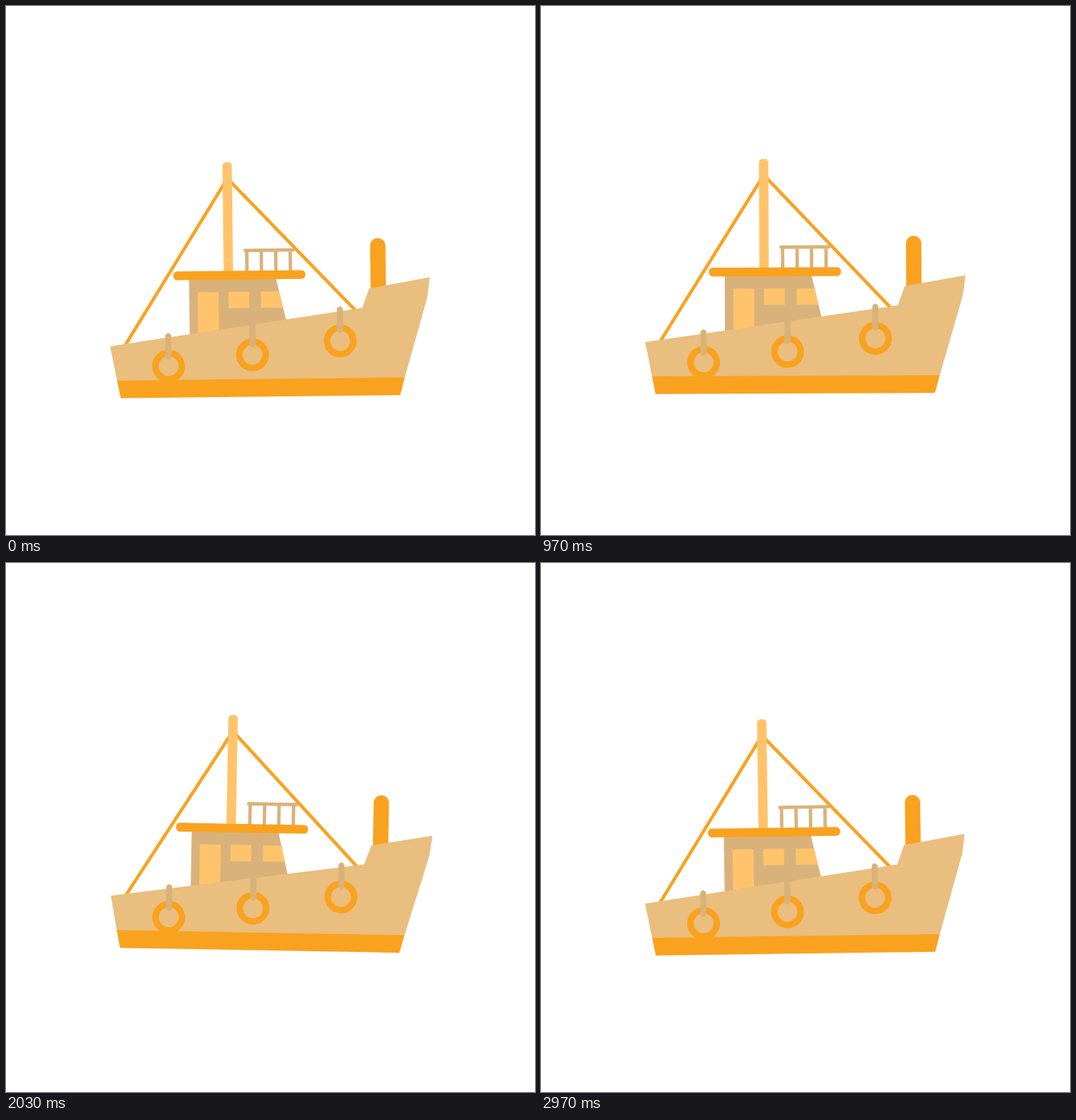
Write an HTML page that moves like this. It is 748 by 748 pixels and loops after 3.01 s.

```html
<!DOCTYPE html>
<html lang="en">
<head>
<meta charset="utf-8">
<title>Boat</title>
<style>
  html, body { margin: 0; width: 100%; height: 100%; overflow: hidden; background: #fff; }
  svg { display: block; width: 100%; height: 100%; }
  .orange { fill: #f9a21f; }
  .light { fill: #ffc46b; }
  .hull { fill: #e9be7e; }
  .tan { fill: #d9b27b; }
  .rope, .ring { fill: none; stroke: #f9a21f; }
  .rail, .strap { fill: none; stroke: #d9b27b; stroke-linecap: round; }
  .rope { stroke-width: 4.6; }
  .ring { stroke-width: 9.2; }
  .rail { stroke-width: 4.8; }
  .strap { stroke-width: 8.4; }
</style>
</head>
<body>
<svg viewBox="0 0 748 748">
  <g id="boat">
    <path class="rope" d="M168 474.2 316 238.4 496 428"/>
    <path class="rail" d="M340 340.5H408.2M342.3 341V372M362.8 341V372M383.2 341V372M403.7 341V372"/>
    <rect class="light" x="309.3" y="215.6" width="13.3" height="160" rx="5"/>
    <path class="tan" d="M260.3 378H382.5L397 440 260.3 462Z"/>
    <path class="light" d="M272.3 399H301.8V458H272.3ZM315.8 399H345V422H315.8ZM361.8 399H387.2L392.6 422H361.8Z"/>
    <rect class="orange" x="238" y="369.2" width="186.7" height="12.4" rx="5.5"/>
    <rect class="orange" x="516.8" y="325.3" width="21.7" height="90" rx="10.8"/>
    <path class="hull" d="M147.6 474 504.8 423.4 514.8 396.3 600.6 381.3 597 409 563.6 523H157Z"/>
    <path class="orange" d="M156.9 522.5H563.7L557 547.5H161.8Z"/>
    <circle class="ring" cx="230" cy="503" r="18.6"/>
    <circle class="ring" cx="348.8" cy="488.2" r="18.6"/>
    <circle class="ring" cx="473" cy="470" r="18.6"/>
    <path class="strap" d="M229.9 460.7V489.5M348.8 445V473.5M473 425.6V454.5"/>
  </g>
</svg>
<script>
  const boat = document.getElementById("boat");
  const PERIOD = 1505;  // two swells per 3010 ms loop
  const start = performance.now();

  const wave = (t, peak) => Math.cos(2 * Math.PI * (t - peak) / PERIOD);

  function draw() {
    const t = performance.now() - start;
    const lift = 2 + 2.7 * wave(t, 0);
    const tilt = 1.02 * wave(t, 540);
    boat.setAttribute("transform", `translate(0 ${lift}) rotate(${tilt} 374 509)`);
    requestAnimationFrame(draw);
  }
  draw();
</script>
</body>
</html>
```
